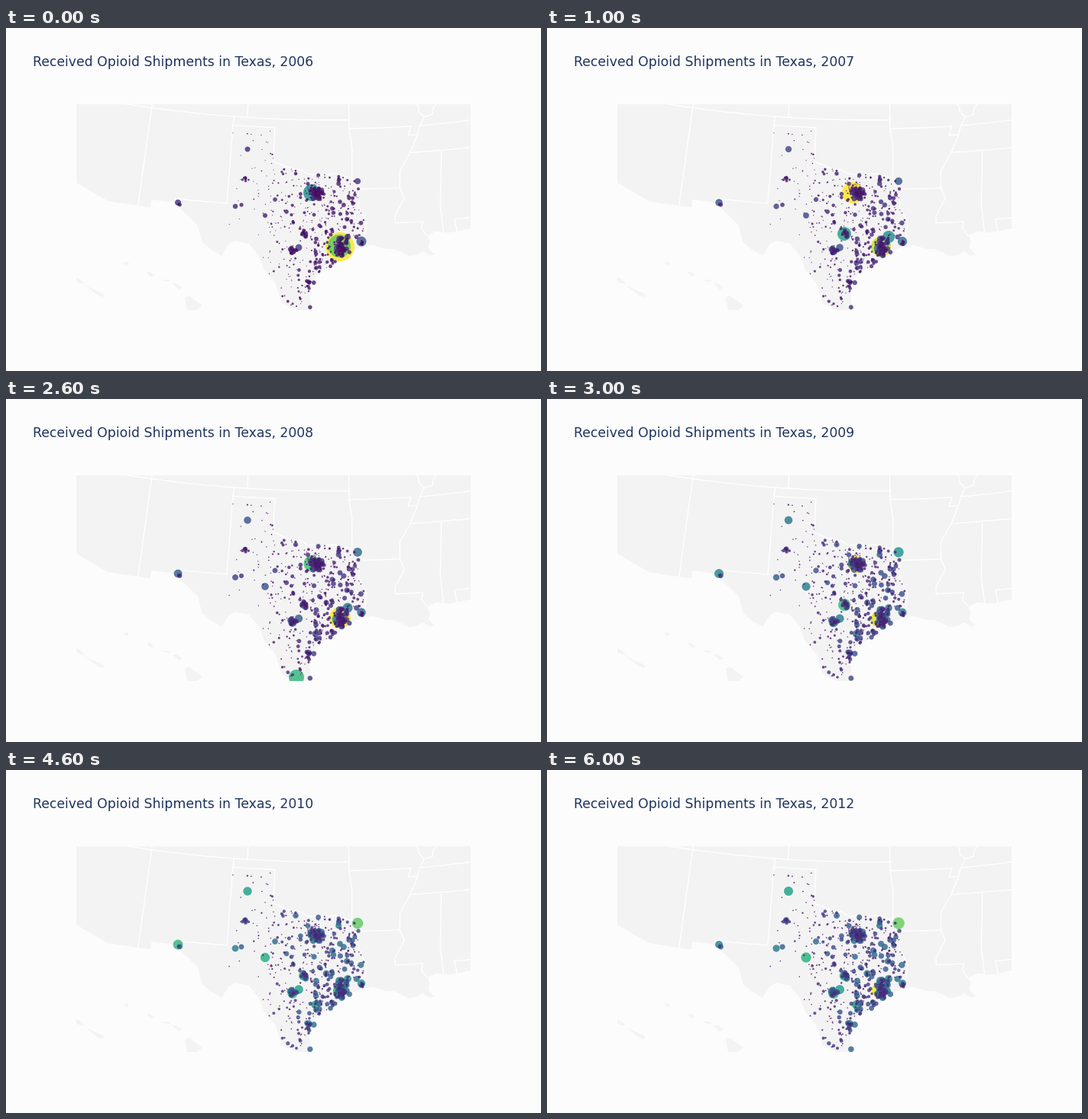
These frames come from a looping animation (700x450 px, 7 s). A matplotlib script:

```python
import matplotlib.pyplot as plt
import numpy as np
from matplotlib.animation import FuncAnimation
from matplotlib.path import Path

W, H, DPI = 700, 450, 100
PAPER, LAND, INK = "#fcfcfc", "#f3f3f3", "#1f3560"
LEFT, RIGHT, TOP, BOTTOM = 92, 608, 100, 370
PX = 72 / DPI
YEARS = range(2006, 2013)
RAMP = np.sin(np.linspace(0, np.pi / 2, len(YEARS)))  # fast growth, then levelling
GROWTH = 1 + 0.42 * RAMP

plt.rcParams["font.family"] = "DejaVu Sans"


def albers(lon, lat):
    """Albers equal-area conic, in stage pixels."""
    s1, s2 = np.sin(np.radians([29.5, 45.5]))
    n = (s1 + s2) / 2
    rho = np.sqrt(1 - s1**2 + 2 * n * (s1 - np.sin(np.radians(lat)))) / n
    theta = n * np.radians(lon + 96)
    return 424 + 1300 * rho * np.sin(theta), -1585 + 1300 * rho * np.cos(theta)


def trace(points, steps=14):
    """Project a lon/lat path so that parallels come out curved."""
    pts = np.array(points, float)
    t = np.arange(len(pts))
    fine = np.linspace(0, len(pts) - 1, (len(pts) - 1) * steps + 1)
    return albers(np.interp(fine, t, pts[:, 0]), np.interp(fine, t, pts[:, 1]))


fig = plt.figure(figsize=(W / DPI, H / DPI), dpi=DPI, facecolor=PAPER)
ax = fig.add_axes([LEFT / W, 1 - BOTTOM / H, (RIGHT - LEFT) / W, (BOTTOM - TOP) / H])
ax.set(xlim=(LEFT, RIGHT), ylim=(BOTTOM, TOP))
ax.axis("off")
title = fig.text(35 / W, 1 - 50 / H, "", size=17.28 * PX, color=INK, va="baseline")


def border(*points):
    ax.plot(*trace(points), color="white", lw=1.4 * PX, zorder=2,
            solid_joinstyle="round")


def island(*points):
    ax.fill(*zip(*points), color=LAND, lw=0, zorder=1)


# Outlines as a few lon/lat points
sonora = [(-114.72, 32.72), (-114.81, 32.5), (-111.07, 31.33), (-108.21, 31.33),
          (-108.21, 31.78)]
rio_grande = [
    (-106.53, 31.78), (-106.2, 31.47), (-105.6, 31.08), (-104.9, 30.6),
    (-104.5, 29.65), (-103.9, 29.28), (-103.15, 28.97), (-102.7, 29.7),
    (-102.3, 29.88), (-101.4, 29.77), (-100.7, 29.1), (-100.3, 28.3),
    (-99.5, 27.5), (-99.1, 26.4), (-98.2, 26.05), (-97.15, 25.9),
]
texas_coast = [(-97.38, 27.2), (-97.2, 27.7), (-96.8, 28.2), (-96, 28.55),
               (-95.1, 29.1), (-94.7, 29.4), (-93.85, 29.7)]
gulf = [
    (-93.2, 29.78), (-92.3, 29.53), (-91.8, 29.5), (-91.3, 29.3), (-90.8, 29.05),
    (-90.2, 29.1), (-89.9, 29.3), (-89.4, 29), (-89.1, 29.05), (-89.5, 29.45),
    (-89.35, 29.8), (-89.5, 30.18), (-88.9, 30.38), (-88.1, 30.25),
    (-87.5, 30.28), (-86.4, 30.4), (-85.5, 30.1), (-84, 30),
]
panhandle = [(-106.62, 32), (-103.06, 32), (-103.04, 36.5), (-100, 36.5)]
red_river = [(-100, 34.56), (-98.6, 34.14), (-98.1, 34.13), (-97.6, 33.9),
             (-96.6, 33.85), (-95.6, 33.93), (-94.48, 33.64), (-94.04, 33.55)]
sabine = [(-94.04, 31.99), (-93.53, 31.1), (-93.7, 30.1), (-93.85, 29.7)]
mississippi = [
    (-90.2, 38.3), (-89.5, 37.6), (-89.5, 37.3), (-89.13, 36.98), (-89.5, 36.5),
    (-89.7, 36), (-90.3, 35), (-91.1, 34), (-91.17, 33), (-90.9, 32.4),
    (-91.6, 31.4), (-91.6, 31), (-89.73, 31), (-89.85, 30.6), (-89.53, 30.18),
]
ohio = [(-89.13, 36.98), (-88.5, 37.1), (-88.45, 37.4), (-88.05, 37.8),
        (-87.1, 37.8), (-86.5, 37.95), (-86, 38)]

mainland = [(-120, 41), (-117, 32.5), *sonora, *rio_grande, *texas_coast, *gulf,
            (-82, 41)]
ax.fill(*trace(mainland), color=LAND, lw=0, zorder=1)
texas = Path(np.column_stack(trace(
    panhandle + red_river + sabine + texas_coast[::-1] + rio_grande[::-1])))

# Islands of the inset maps, in pixels
island((92, 327), (98, 330), (103, 336), (92, 333))
island((103, 337), (112, 342), (128, 349), (127, 353), (119, 350))
island((154, 309), (157, 306), (161, 308), (159, 311))
island((184, 320), (189, 320), (194, 325), (189, 326))
island((205, 330), (215, 331), (214, 333), (206, 332))
island((218, 335), (222, 335), (231, 340), (226, 343))
island((234, 354), (239, 351), (257, 364), (250, 370), (237, 370))

border(rio_grande[0], *panhandle, *red_river, *sabine)
border(*mississippi)
border(*ohio)
border((-114.05, 37), (-109.05, 37), (-102.04, 37), (-94.62, 37))
border((-109.05, 39), (-109.05, 31.33))
border((-102.04, 39), (-102.04, 37))
border((-103, 37), (-103.04, 36.5))
border((-94.62, 39), (-94.62, 36.5), (-94.43, 35.39), (-94.48, 33.64))
border((-94.62, 36.5), (-90.15, 36.5), (-90.37, 36), (-89.7, 36))
border((-94.04, 33.55), (-94.04, 33.02), (-91.17, 33))
border((-89.5, 36.5), (-84, 36.6))
border((-90.3, 35), (-85, 35))
border((-88.1, 34.9), (-88.47, 31.9), (-88.4, 30.3))
border((-84, 31), (-87.6, 31), (-87.5, 30.28))

# x, y, radius in the first and in the last year
CITIES = {
    "Houston": (437, 287, 5, 5),
    "Pasadena": (436, 286, 5, 5),
    "Pearland": (434, 289, 5, 9.5),
    "Baytown": (447, 274, 4, 5),
    "Fort Worth": (400, 216, 11, 5),
    "Dallas": (405, 217, 5, 7),
    "Austin": (389, 270, 3.5, 6.3),
    "San Antonio": (375, 293, 4.4, 7),
    "New Braunfels": (383, 288, 4.4, 6),
    "Beaumont": (465, 280, 6.5, 5),
    "McAllen": (380, 365, 1, 2),
    "Texarkana": (460, 201, 4, 7.7),
    "San Angelo": (339, 246, 3, 6.6),
    "El Paso": (225, 229, 4, 6.8),
    "Amarillo": (316, 159, 3.5, 6),
    "Lubbock": (313, 197, 2.3, 4),
    "Odessa": (300, 234, 3.3, 4.6),
    "Midland": (308, 232, 2.6, 3.6),
    "Abilene": (352, 225, 2.8, 4),
    "Brownwood": (367, 241, 2.8, 3.4),
    "Wichita Falls": (379, 191, 2.3, 4),
    "Victoria": (405, 308, 2.8, 6),
    "Corpus Christi": (396, 333, 3, 5),
    "College Station": (419, 267, 2.3, 4.6),
    "Waco": (403, 245, 2.4, 3.8),
    "Tyler": (437, 228, 2.8, 4),
    "Longview": (449, 223, 2.8, 3.8),
}
# Years that break a city's trend
SURGES = {
    "Houston": {2006: 19, 2007: 13, 2008: 14},
    "Pasadena": {2006: 15},
    "Pearland": {2009: 10.5, 2010: 6, 2011: 10},
    "Baytown": {2007: 8, 2008: 6.5},
    "Fort Worth": {2007: 14, 2008: 10.5},
    "Dallas": {2009: 11, 2010: 9, 2011: 10.2},
    "Austin": {2007: 9, 2009: 8, 2011: 10.4},
    "McAllen": {2008: 10},
    "El Paso": {2012: 5},
}
# Suburbs: spread in x and y, count
METROS = {
    "Dallas": (4.5, 4, 70),
    "Houston": (4, 6, 60),
    "Austin": (2, 3.5, 14),
    "San Antonio": (2.5, 2.5, 14),
    "Corpus Christi": (3, 2, 6),
    "Lubbock": (2.5, 2.5, 6),
    "Beaumont": (2, 2.5, 6),
    "El Paso": (1.5, 1.5, 2),
}


def city_rows():
    for name, (x, y, first, last) in CITIES.items():
        radii = first + (last - first) * RAMP
        for year, r in SURGES.get(name, {}).items():
            radii[year - YEARS[0]] = r
        yield x, y, *radii


def suburb_rows(rng):
    for name, (sx, sy, count) in METROS.items():
        x, y = CITIES[name][:2]
        for dx, dy in np.clip(rng.normal(size=(count, 2)), -1.9, 1.9):
            r = 1.2 + 2.2 * rng.random() ** 1.6
            yield x + 1 + sx * dx, y + sy * dy, *(r * GROWTH)


def country_rows(rng):
    """Small towns, denser and larger towards the east."""
    x0, x1, y0, y1 = 270, 470, 130, 370
    for _ in range(1400):
        x, y = rng.uniform(x0, x1), rng.uniform(y0, y1)
        density = min(1, (x - 262) / 140) ** 2
        if rng.random() < density and texas.contains_point((x, y)):
            r = 0.55 + 2.4 * density * rng.random() ** 3
            yield x, y, *(r * GROWTH)


rng = np.random.default_rng(12)
places = np.array([*city_rows(), *suburb_rows(rng), *country_rows(rng)])
viridis = plt.get_cmap("viridis")
dots = ax.scatter([], [], linewidths=0, alpha=0.82, zorder=3)


def draw(i):
    radius = places[:, 2 + i]
    order = np.argsort(-radius, kind="stable")  # small dots on top
    r = radius[order]
    dots.set_offsets(places[order, :2])
    dots.set_sizes((2 * r * PX) ** 2)
    dots.set_facecolor(viridis((r / r.max()) ** 1.25))
    title.set_text(f"Received Opioid Shipments in Texas, {YEARS[i]}")
    return dots, title


anim = FuncAnimation(fig, draw, frames=len(YEARS), interval=1000, repeat=True,
                     repeat_delay=0)
plt.show()
```
